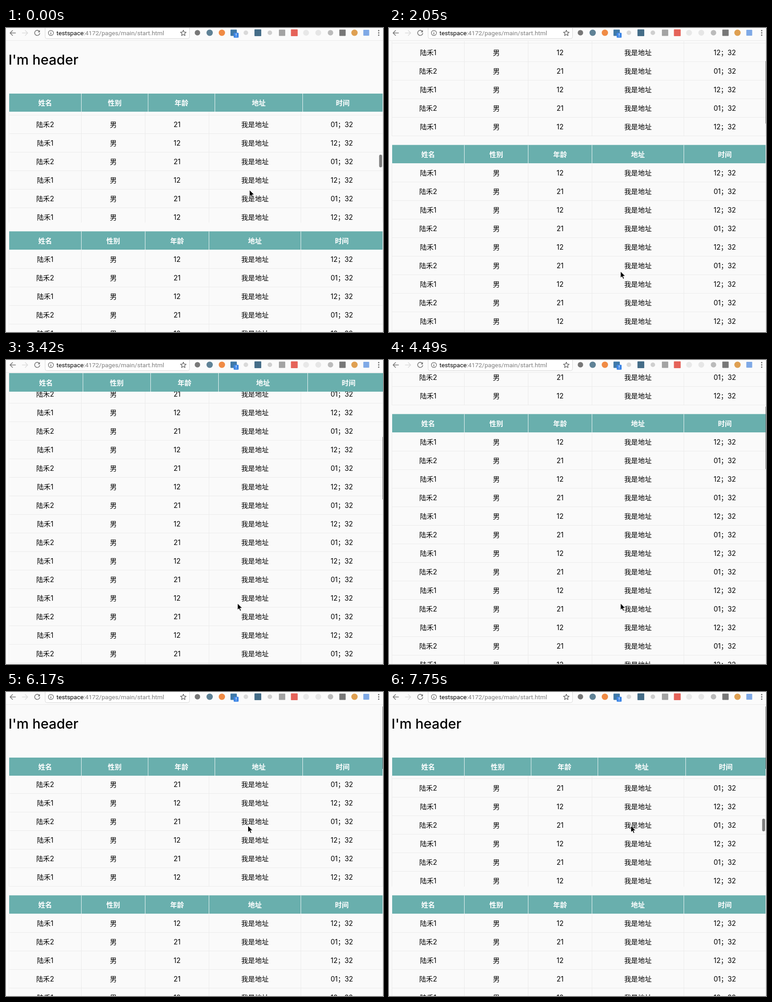
An HTML page for the animation above (8 s loop, 833 by 672 pixels).

```html
<!DOCTYPE html>
<html lang="zh-CN">
<head>
<meta charset="utf-8">
<title>Sticky table header</title>
<style>
html, body { margin: 0; width: 100%; height: 100%; overflow: hidden; background: #fafafa; }
svg { display: block; width: 100%; height: 100%; }
text { font: 15.2px Inter, "Noto Sans CJK SC", "Noto Sans CJK", sans-serif; text-anchor: middle; fill: #000; }
text.head { font-weight: 700; fill: #fff; }
text.title { font: 500 30.3px Inter, sans-serif; text-anchor: start; }
text.url { font: 13.7px Roboto, sans-serif; text-anchor: start; }
text.badge { font: 700 9px Roboto, sans-serif; fill: #fff; }
</style>
</head>
<body>
<svg id="stage" viewBox="0 0 833 672">
  <defs>
    <clipPath id="view"><rect y="29" width="833" height="643"/></clipPath>
    <clipPath id="box"><rect y="185" width="833" height="245"/></clipPath>
  </defs>
  <rect width="833" height="672" fill="#fafafa"/>
  <g clip-path="url(#view)">
    <g id="page">
      <text class="title" x="5.5" y="81">I'm header</text>
      <g clip-path="url(#box)"><g id="inner"></g></g>
      <g id="heads"></g>
      <g id="list"></g>
      <rect id="innerBar" x="824.5" width="6.5" height="28" rx="3.25" fill="#7c7c7c"/>
    </g>
    <g id="fixed"></g>
    <rect id="pageBar" x="832" width="1" fill="#6c6c6c"/>
  </g>
  <g id="toolbar" fill="none" stroke-linecap="round" stroke-linejoin="round">
    <rect width="833" height="28" fill="#fbfbfb"/>
    <path d="M0 27.5H833" stroke="#e9e9e9"/>
    <path d="M86.5 -4V19.5Q86.5 23.5 90.5 23.5H401.5Q405.5 23.5 405.5 19.5V-4" fill="#fff" stroke="#d6d6d6"/>
    <path d="M21 11H9.5M14.5 5.5L9 11L14.5 16.5" stroke="#777" stroke-width="1.6"/>
    <path d="M36 11H47.5M42.5 5.5L48 11L42.5 16.5" stroke="#dcdcdc" stroke-width="1.6"/>
    <path d="M73.3 7A5.7 5.7 0 1 0 74.6 12" stroke="#777" stroke-width="1.6"/>
    <path d="M75 4.5V9.5H70Z" fill="#777"/>
    <circle cx="99.2" cy="11" r="5.6" stroke="#666" stroke-width="1.2"/>
    <path d="M99.2 10.6V13.8M99.2 8.2V8.3" stroke="#555" stroke-width="1.4"/>
    <text class="url" x="111.5" y="15.7">testspace<tspan fill="#7d7d7d">:4172/pages/main/start.html</tspan></text>
    <path id="star" stroke="#555" stroke-width="1.2"/>
    <g id="icons"></g>
    <rect x="503" y="10.5" width="11" height="11" rx="1.5" fill="#3f87e6"/>
    <text class="badge" x="508.5" y="19.3">!</text>
    <g fill="#666"><circle cx="823.5" cy="5.8" r="1.5"/><circle cx="823.5" cy="10.8" r="1.5"/><circle cx="823.5" cy="15.8" r="1.5"/></g>
  </g>
  <path id="cursor" d="M0 0V14.6L3.4 11.5L5.7 16.8L8.1 15.7L5.9 10.6H10.6Z" fill="#000" stroke="#fff" stroke-width="1" stroke-linejoin="round"/>
</svg>
<script>
const LOOP = 8000, ROW = 41;
const TEAL = '#69afad', LINE = '#ebebeb';
const TITLES = ['姓名', '性别', '年龄', '地址', '时间'];
const ROWS = [
  ['陆禾1', '男', '12', '我是地址', '12；32'],
  ['陆禾2', '男', '21', '我是地址', '01；32']
];
const COLS = [6.5, 166.5, 307.5, 448.5, 651.5, 832.5];
const WIDE = [6.5, 166.5, 314, 461.5, 655.5, 832.5];
const STUCK = [6.5, 170, 319.5, 469.5, 666.5, 847.5];

// [time, value...] steps; each holds until the next
const SCROLL = [
  [0, 0], [1190, 10], [1340, 53], [1660, 120], [2050, 191], [2410, 194],
  [2790, 614], [3090, 618], [3420, 641], [4020, 575], [4160, 480],
  [4490, 330], [4750, 235], [5020, 176], [5350, 75], [5640, -8],
  [5910, 0], [7120, -7], [7390, -1], [7750, 0]
];
const INNER = [[0, 0], [290, 13], [620, 9], [6500, -2], [6760, 5], [7120, 3], [7390, 2], [7750, 1]];
const POINTER = [[0, 538, 358], [620, 527, 440], [830, 511.5, 538], [5910, 523, 410], [6170, 534.5, 295.5]];
const PAGE_BAR = [[0, 0], [1340, 1], [3720, 0], [4020, 1], [6500, 0], [7120, 1]];
const INNER_BAR = [[0, 1], [620, 0], [6500, 1]];

const $ = id => document.getElementById(id);

function add(parent, tag, attrs, text) {
  const el = document.createElementNS('http://www.w3.org/2000/svg', tag);
  for (const k in attrs) el.setAttribute(k, attrs[k]);
  if (text) el.textContent = text;
  parent.appendChild(el);
}

function cells(parent, words, cols, y, cls) {
  words.forEach((word, i) =>
    add(parent, 'text', { x: (cols[i] + cols[i + 1]) / 2, y: y + 5.7, class: cls }, word));
}

function header(parent, cols, y, h) {
  add(parent, 'rect', { x: 7, y, width: cols[5] - 7.5, height: h, fill: TEAL });
  for (const x of cols.slice(1, 5))
    add(parent, 'path', { d: `M${x} ${y}v${h}`, stroke: '#f0f7f7' });
  cells(parent, TITLES, cols, y + h / 2 + 0.5, 'head');
}

// first: centre of the first row; odd: 1 when it starts with the second record
function body(parent, first, count, odd) {
  const top = first - 20.5, end = top + count * ROW;
  for (const x of COLS)
    add(parent, 'path', { d: `M${x} ${top}V${end}`, stroke: LINE });
  for (let i = 0; i < count; i++) {
    const y = first + i * ROW;
    add(parent, 'path', { d: `M6 ${y + 20.5}H833`, stroke: LINE });
    cells(parent, ROWS[(i + odd) % 2], COLS, y, '');
  }
}

function icons() {
  const list = [
    [423, '#777', 1, 6], [450, '#5f8296', 1, 7], [477, '#f08b45', 1, 7], [503, '#3f79a8', 0, 7],
    [530, '#d9d9d9', 1, 5], [556.5, '#456d88', 0, 7.5], [583, '#cfcfcf', 1, 5], [610, '#a3a3a3', 0, 7],
    [637, '#e5635a', 0, 7.5], [663, '#e8e8e8', 1, 6.5], [690, '#e6e6e6', 1, 6.5], [717, '#bbb', 1, 6],
    [743.5, '#777', 0, 7], [770, '#dfa052', 1, 7], [796, '#7fa9e6', 0, 6.5]
  ];
  for (const [x, fill, round, r] of list) {
    if (round) add($('icons'), 'circle', { cx: x, cy: 10.5, r, fill });
    else add($('icons'), 'rect', { x: x - r, y: 10.5 - r, width: 2 * r, height: 2 * r, rx: 1, fill });
  }
}

function star(cx, cy, r) {
  let d = '';
  for (let i = 0; i < 10; i++) {
    const a = i * Math.PI / 5, q = i % 2 ? r * 0.45 : r;
    d += (i ? 'L' : 'M') + (cx + q * Math.sin(a)).toFixed(2) + ' ' + (cy - q * Math.cos(a)).toFixed(2);
  }
  return d + 'Z';
}

function at(track, t) {
  let v = track[0];
  for (const step of track) if (step[0] <= t) v = step;
  return v.slice(1);
}

function move(el, x, y) { el.setAttribute('transform', `translate(${x} ${y})`); }
function show(el, on) { el.setAttribute('visibility', on ? 'visible' : 'hidden'); }

function draw(t) {
  const [scroll] = at(SCROLL, t), [inner] = at(INNER, t);
  move($('page'), 0, -scroll);
  move($('inner'), 0, -inner);
  move($('cursor'), ...at(POINTER, t));
  show($('fixed'), scroll > 421);
  show($('pageBar'), at(PAGE_BAR, t)[0]);
  show($('innerBar'), at(INNER_BAR, t)[0]);
  $('pageBar').setAttribute('y', 32 + Math.max(0, scroll) * 0.2155);
  $('pageBar').setAttribute('height', 138 + Math.min(0, scroll));
  $('innerBar').setAttribute('y', 280 + inner * 0.11);
}

body($('inner'), 213 - 2 * ROW, 10, 1);
header($('heads'), WIDE, 145, 40);
header($('heads'), COLS, 449.5, 40.5);
body($('list'), 511, 30, 0);
header($('fixed'), STUCK, 29, 41);
icons();
$('star').setAttribute('d', star(391.8, 11.3, 6.6));

const start = performance.now();
function tick() {
  draw((performance.now() - start) % LOOP);
  requestAnimationFrame(tick);
}
draw(0);
requestAnimationFrame(tick);
</script>
</body>
</html>
```
